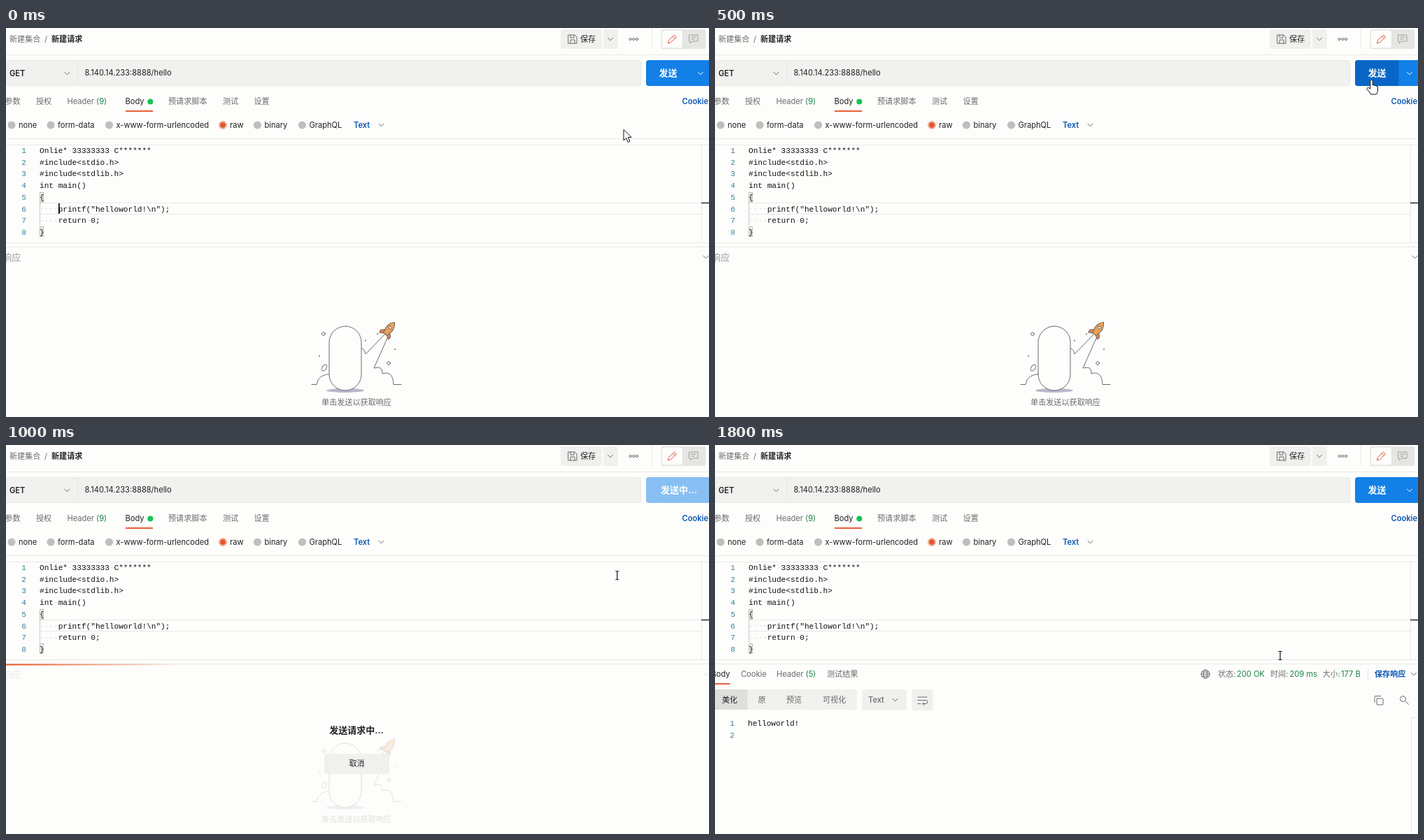
Write an HTML page that moves like this. It is 1005 px wide and 557 px high and loops after 1.9 s.

```html
<!DOCTYPE html>
<html lang="zh-CN">
<head>
<meta charset="utf-8">
<title>新建请求</title>
<style>
html, body { margin: 0; width: 100%; height: 100%; overflow: hidden; background: #fdfdfb; }
svg { display: block; width: 1005px; height: 557px; }
text { font: 11.1px Inter, 'Noto Sans CJK SC', 'Noto Sans CJK', sans-serif; fill: #6b6b6b; white-space: pre; }
.dark { fill: #212121; }
.bold { font-weight: 600; }
.blue { fill: #0b57b5; font-weight: 600; }
.green { fill: #1a8245; }
.big { font-size: 13px; }
.mid { text-anchor: middle; }
.end { text-anchor: end; }
.code text { font-family: 'Liberation Mono', monospace; fill: #111; }
.code .num { fill: #3a8098; text-anchor: end; }
.line { fill: none; stroke: #6b6b6b; stroke-width: 1; stroke-linecap: round; stroke-linejoin: round; }
.rule { fill: none; stroke: #e8e8e6; }
.box { fill: #f0f0ee; }
</style>
</head>
<body>
<svg viewBox="0 0 1005 557">
  <defs>
    <linearGradient id="glow">
      <stop offset="0" stop-color="#e8521a" stop-opacity="0"/>
      <stop offset=".5" stop-color="#e8521a"/>
      <stop offset="1" stop-color="#e8521a" stop-opacity="0"/>
    </linearGradient>
    <path id="chev" class="line" d="M-3.5 -1.8L0 1.8L3.5 -1.8"/>
  </defs>

  <!-- header -->
  <text x="5" y="20">新建集合</text><text x="55" y="20">/</text>
  <text x="65" y="20" class="dark bold">新建请求</text>
  <rect class="box" x="793" y="2" width="59" height="28" rx="3"/>
  <rect class="box" x="854" y="2" width="21" height="28" rx="3"/>
  <path class="line" d="M804 10h9l3 3v9h-12zM807 10v4h5v-4M807 22v-5h6v5"/>
  <text x="821" y="20" class="dark">保存</text>
  <use href="#chev" x="864" y="16"/>
  <g class="line"><circle cx="892.5" cy="16" r="1.6"/><circle cx="897.3" cy="16" r="1.6"/><circle cx="902.1" cy="16" r="1.6"/></g>
  <path class="rule" d="M923.5 0V30M0 38.5H1005"/>
  <rect x="936.5" y="2" width="64" height="28" rx="3" fill="#e5e5e3"/>
  <rect x="937.5" y="3" width="30" height="26" rx="3" fill="#fdfdfb" stroke="#e0e0de"/>
  <path class="line" style="stroke:#e2583e" d="M946.5 21.5l1-4 8-7.5 3 3-8 7.5zM953.5 12l3 3"/>
  <path class="line" style="stroke:#a0a0a0" d="M977 10h12v9h-8l-3 3v-3h-1zM980 13h6M980 16h4"/>

  <!-- address bar -->
  <rect x="-4" y="46.5" width="911.5" height="36" rx="3" fill="#f1f1ef" stroke="#e8e8e6"/>
  <path class="rule" d="M102.5 47V82"/>
  <text x="5" y="69" class="dark bold">GET</text>
  <use href="#chev" x="87.5" y="65"/>
  <text x="112.5" y="68" class="dark">8.140.14.233:8888/hello</text>
  <g id="idle">
    <rect x="915" y="46" width="96" height="37" rx="4" fill="#1280e6"/>
    <path id="hover" d="M919 46H977.5V83H919a4 4 0 0 1-4-4V50a4 4 0 0 1 4-4z" fill="#0867c6"/>
    <text x="946.5" y="69" class="big mid" style="fill:#fff;font-weight:700">发送</text>
    <path class="line" style="stroke:#fff" d="M989.5 63.2l3.5 3.6 3.5-3.6"/>
  </g>
  <g id="busy">
    <rect x="915" y="46" width="96" height="37" rx="4" fill="#88bff2"/>
    <text x="936" y="69" class="big" style="fill:#fff;font-weight:700">发送中...</text>
  </g>

  <!-- request tabs -->
  <text x="-1.5" y="109">参数</text><text x="43" y="109">授权</text>
  <text x="87.5" y="109">Header <tspan class="green">(9)</tspan></text>
  <text x="170.5" y="109" class="dark">Body</text>
  <circle cx="206.3" cy="105.5" r="4" fill="#14c552"/>
  <rect x="171" y="118" width="39" height="2" fill="#e8603c"/>
  <text x="232" y="109">预请求脚本</text><text x="310" y="109">测试</text><text x="354.5" y="109">设置</text>
  <text x="966.5" y="109" class="blue">Cookie</text>

  <g id="radios"></g>
  <text x="497" y="143" class="blue">Text</text>
  <use href="#chev" x="536.5" y="139" style="stroke:#0b57b5"/>
  <path class="rule" d="M0 158.5H1005"/>

  <!-- editor -->
  <path class="rule" d="M0 167.5H1005M0 307.5H1005M0 313.5H1005M994.5 167V307M48 250.5H994M48 266.5H994"/>
  <path d="M994 250.5H1005" stroke="#55555c" stroke-width="2"/>
  <path d="M48.5 250V283" stroke="#c9c9c9"/>
  <path d="M48.5 235.5h5v14h-5zM48.5 284.5h5v14h-5z" fill="#eeeeea" stroke="#b9b9b5"/>
  <g id="editor" class="code"></g>
  <rect id="caret" x="75" y="251" width="1.6" height="15" fill="#000"/>

  <!-- empty response -->
  <g id="empty">
    <text x="-5" y="333" class="big" style="fill:#9c9c9c">响应</text>
    <use href="#chev" x="1000.5" y="328"/>
    <ellipse cx="485" cy="519" rx="27" ry="3" fill="#bcb6cc"/>
    <g class="line">
      <path d="M437 510.5h7q2-16 23-15M503 461q8-7 11 6l29-30M546 442l-20 45q13-4 12 8q15-5 16 15.500h11"/>
      <circle cx="454" cy="438" r="2.3"/><circle cx="547" cy="480" r="2.3"/>
      <ellipse cx="455" cy="486.500" rx="3" ry="5" transform="rotate(35 455 486.500)"/>
      <rect x="462" y="427" width="46" height="92" rx="23" fill="#fdfdfb"/>
      <g transform="translate(547.500 431.500) rotate(38)">
        <path fill="#e2824a" d="M-4 3l-5 5 1 4 5-3M4 3l5 5-1 4-5-3"/>
        <path fill="#eda052" d="M0 -13q6 6 5 14l-2 8h-6l-2-8q-1-8 5-14z"/>
        <circle cy="-3" r="2" fill="#fdfdfb"/>
      </g>
    </g>
    <g fill="#6b6b6b"><circle cx="514" cy="447.500" r="1"/><circle cx="531" cy="438" r="1"/><circle cx="556" cy="460" r="1"/><circle cx="448" cy="469.500" r="1"/></g>
    <text x="501" y="540" class="mid">单击发送以获取响应</text>
  </g>

  <!-- sending -->
  <g id="sending">
    <rect id="bar" y="313.500" width="506" height="2" fill="url(#glow)"/>
    <text x="501" y="413" class="big bold dark mid">发送请求中...</text>
    <rect class="box" x="455" y="442" width="93" height="29" rx="3"/>
    <text x="501.500" y="460" class="dark mid">取消</text>
  </g>

  <!-- response -->
  <g id="result">
    <text x="21.500" y="332" class="dark end">Body</text>
    <rect y="341" width="21.500" height="2" fill="#e8603c"/>
    <text x="37" y="332">Cookie</text>
    <text x="88" y="332">Header <tspan class="green">(5)</tspan></text>
    <text x="160" y="332">测试结果</text>
    <g class="line"><circle cx="701" cy="328" r="6"/><ellipse cx="701" cy="328" rx="2.700" ry="6"/><path d="M695 328h12M696 325h10M696 331h10"/></g>
    <text x="719" y="332">状态:</text><text x="746" y="332" class="green">200 OK</text>
    <text x="794" y="332">时间:</text><text x="821.500" y="332" class="green">209 ms</text>
    <text x="868.500" y="332">大小:</text><text x="895" y="332" class="green">177 B</text>
    <path class="rule" d="M933.500 320V337"/>
    <text x="943" y="332" class="blue">保存响应</text>
    <use href="#chev" x="999" y="328" style="stroke:#0b57b5"/>
    <path class="box" d="M0 350H200a3 3 0 0 1 3 3V376a3 3 0 0 1-3 3H0z"/>
    <rect y="350" width="46.500" height="29" fill="#dededc"/>
    <text x="10" y="369" class="dark">美化</text><text x="61.500" y="369">原</text>
    <text x="102" y="369">预览</text><text x="154" y="369">可视化</text>
    <rect class="box" x="210" y="350" width="64" height="30" rx="3"/>
    <text x="219" y="369" style="font-weight:500">Text</text>
    <use href="#chev" x="257.500" y="365"/>
    <rect class="box" x="281.500" y="350" width="30" height="30" rx="3"/>
    <path class="line" d="M290 361h13M290 365.500h11q3 0 3 2.500t-3 2.500h-4m2-2l-2 2 2 2M290 370.500h4"/>
    <g class="line">
      <rect x="946" y="363" width="9" height="9" rx="1"/><path d="M943 368.500v-8q0-1 1-1h8"/>
      <circle cx="983.500" cy="363.500" r="4"/><path d="M986.500 366.500l5 5"/>
    </g>
    <path class="rule" d="M1005 390.500H995.500V557"/>
    <g class="code">
      <text x="28" y="402" class="num">1</text><text x="28" y="418.500" class="num">2</text>
      <text x="47" y="402">helloworld!</text>
    </g>
  </g>

  <!-- pointers -->
  <g id="pointer" stroke="#111" stroke-linejoin="round">
    <path id="arrow" fill="#fff" d="M0 0V15.500L3.600 12L6.200 18L8.800 16.900L6.200 11H11Z"/>
    <path id="hand" fill="#fff" d="M-1.700 1.500Q0-1 1.700 1.500V8Q3.200 6.500 4.300 8.500Q6 7.500 7 9.300Q9 9 9 11V15Q9 18 7 21H-1Q-3 17-6.500 13.500Q-6.500 10.500-3.500 11.800L-1.700 13.200Z"/>
    <path id="beam" fill="none" d="M-2.500-6H2.500M0-6V6M-2.500 6H2.500" stroke-width="1.200"/>
  </g>
</svg>
<script>
const $ = id => document.getElementById(id);
const CH = 6.66, LOOP = 1900, STEP = 100;

const radios = [[8, 'none'], [64, 'form-data'], [147.5, 'x-www-form-urlencoded'],
  [310, 'raw'], [359.5, 'binary'], [423.5, 'GraphQL']];
$('radios').innerHTML = radios.map(([x, label]) => {
  const dot = label === 'raw'
    ? `<circle cx="${x}" cy="139" r="5.2" fill="#fff" stroke="#e2754f"/><circle cx="${x}" cy="139" r="4" fill="#e5562c"/>`
    : `<circle cx="${x}" cy="139" r="5.6" fill="#bfbfbd"/>`;
  return `${dot}<text x="${x + 10}" y="143" class="dark">${label}</text>`;
}).join('');

const code = ['Onlie* 33333333 C*******', '#include<stdio.h>', '#include<stdlib.h>', 'int main()',
  '{', '    printf("helloworld!\\n");', '    return 0;', '}'];
const esc = s => s.replace(/</g, '&lt;').replace(/>/g, '&gt;');
$('editor').innerHTML = code.map((src, i) => {
  const y = 179 + i * 16.7, body = src.trimStart(), pad = src.length - body.length;
  const spaces = [...src].map((c, k) => c === ' '
    ? `<circle cx="${48 + (k + .5) * CH}" cy="${y - 3.5}" r=".7" fill="#c4c4c4"/>` : '').join('');
  return `<text x="29" y="${y}" class="num">${i + 1}</text>${spaces}<text x="${48 + pad * CH}" y="${y}">${esc(body)}</text>`;
}).join('');

// time, x, y of the pointer
const path = [[0, 883, 145.5], [100, 890, 138], [200, 912, 114], [300, 929, 92],
  [400, 937, 80], [500, 938.5, 74], [800, 939.5, 72], [1200, 808, 301.5]];

function pointerAt(t) {
  const i = path.findIndex(p => p[0] > t);
  if (i < 0) return path[path.length - 1].slice(1);
  const [t0, x0, y0] = path[i - 1], [t1, x1, y1] = path[i];
  let k = (t - t0) / (t1 - t0);
  if (t0 === 800) k = k * k * (3 - 2 * k);
  return [x0 + (x1 - x0) * k, y0 + (y1 - y0) * k];
}

const show = (id, on) => $(id).style.display = on ? '' : 'none';

function draw(now) {
  const t = Math.floor(now % LOOP / STEP) * STEP;
  const busy = t >= 700 && t < 1300, done = t >= 1300;
  const [x, y] = pointerAt(t);
  const kind = y < 83 ? 'hand' : y > 167 ? 'beam' : 'arrow';

  $('pointer').setAttribute('transform', `translate(${x} ${y})`);
  for (const id of ['arrow', 'hand', 'beam']) show(id, id === kind);
  show('hover', kind === 'hand');
  show('idle', !busy);
  show('busy', busy);
  show('sending', busy);
  show('empty', !done);
  show('result', done);
  show('caret', t < 500);
  $('empty').style.opacity = busy ? .2 : 1;
  $('bar').setAttribute('x', (t - 1200) * 1.27);
}

function tick(now) {
  draw(now);
  requestAnimationFrame(tick);
}
draw(0);
requestAnimationFrame(tick);
</script>
</body>
</html>
```
